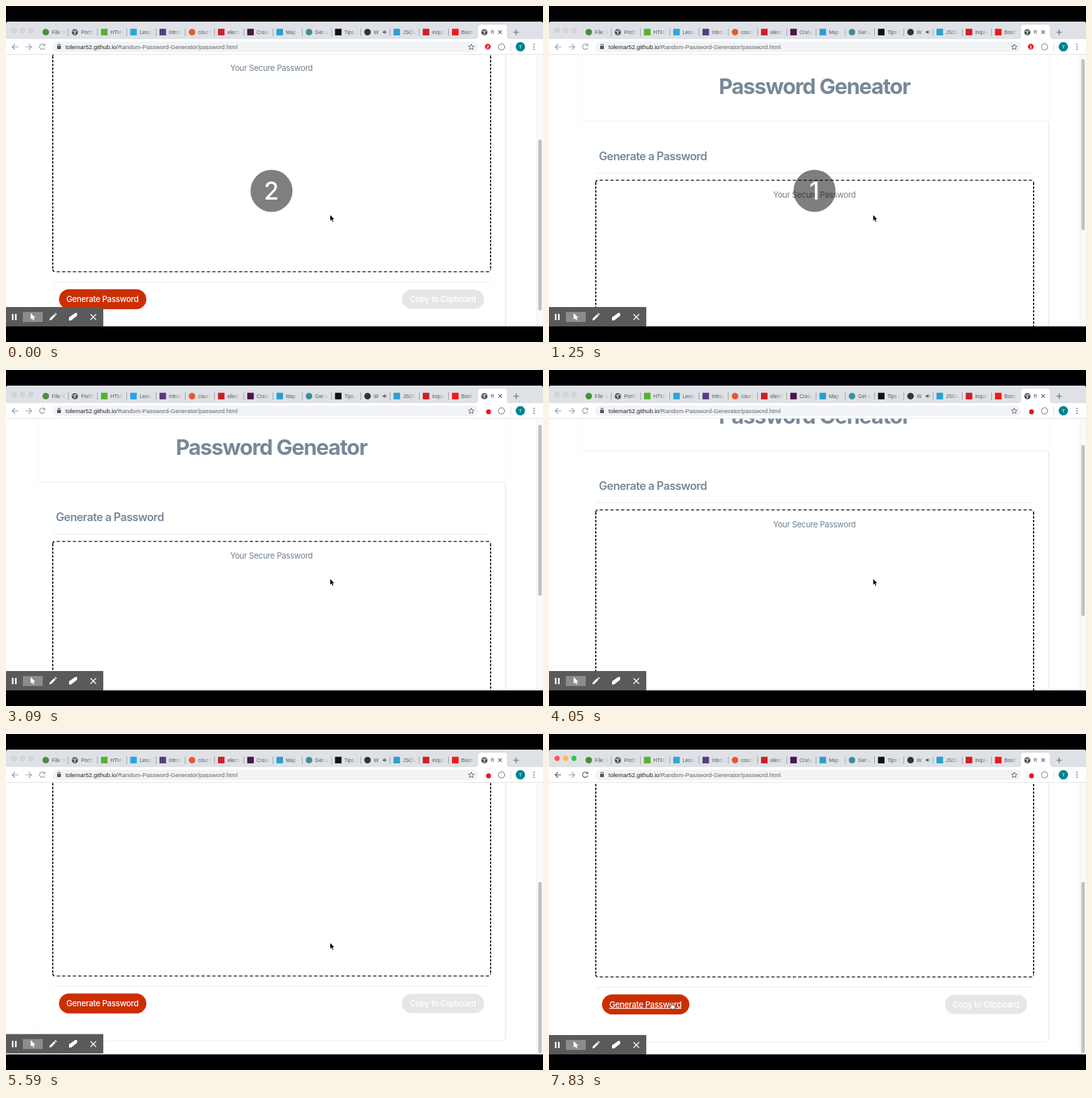
Animation, 861 px wide and 538 px high, one loop 8 s. Source, as an HTML page:

```html
<!DOCTYPE html>
<html lang="en">
<head>
<meta charset="utf-8">
<title>Password generator demo</title>
<style>
html, body { margin: 0; width: 100%; height: 100%; overflow: hidden; background: #000; }
svg { display: block; }
.ui { font-family: "Liberation Sans", Arial, sans-serif; }
.page { font-family: Inter, Roboto, sans-serif; font-size: 13px; letter-spacing: -.026em; fill: #708090; text-anchor: middle; }
.title { font-size: 34.5px; font-weight: 700; letter-spacing: -.04em; fill: #778899; }
.sub { font-size: 18px; font-weight: 600; letter-spacing: -.034em; fill: #778899; text-anchor: start; }
.btn { font-weight: 500; fill: #fff; }
.line { fill: none; stroke: #5f6368; stroke-width: 1.2; }
#card { filter: drop-shadow(1px 0 1.5px rgba(0, 0, 0, .13)); }
#lights circle { fill: #d3d5d9; stroke: #c6c8cc; stroke-width: .6; }
.active #lights circle { fill: var(--c); stroke: none; }
#back, #reload { stroke: #92969b; }
.active #back, .active #reload { stroke: #505458; }
.active #generate { text-decoration: underline; }
#hand, .active #arrow { display: none; }
.active #hand { display: inline; }
</style>
</head>
<body>
<svg id="stage" width="861" height="538" viewBox="0 0 861 538">
  <defs>
    <linearGradient id="fade"><stop stop-color="#dee1e6" stop-opacity="0"/><stop offset="1" stop-color="#dee1e6"/></linearGradient>
    <clipPath id="view"><path d="M0 78H861V513H0Z"/></clipPath>
    <path id="pointer" d="M0 0V10.6L2.4 8.4 4 12.1 5.9 11.3 4.3 7.7H7.6Z"/>
  </defs>
  <rect width="861" height="538"/>
  <path d="M0 513V29Q0 25 4 25H857Q861 25 861 29V513Z" fill="#fff"/>

  <g clip-path="url(#view)">
    <g id="page" class="page">
      <path d="M51.5 70V184M803 70V184" stroke="#f6f6f6"/>
      <rect id="card" x="52" y="185" width="748" height="546" rx="3" fill="#fff"/>
      <text class="title" x="425.5" y="140.5">Password Geneator</text>
      <text class="sub" x="80" y="246.5">Generate a Password</text>
      <path d="M75 267.5H777M75 644.5H777" stroke="#ebebeb"/>
      <g fill="none" stroke="#222" stroke-width="1.7">
        <path d="M75 283Q75 279 79 279H773Q777 279 777 283M75 624Q75 628 79 628H773Q777 628 777 624" stroke-dasharray="5.2 3.4"/>
        <path d="M75 283V624M777 283V624" stroke-dasharray="3.8 2.2" stroke-width="2"/>
      </g>
      <text x="425.5" y="306.5">Your Secure Password</text>
      <rect x="85" y="656" width="140" height="32" rx="16" fill="#cc2e00"/>
      <text id="generate" class="btn" x="154.5" y="676.7">Generate Password</text>
      <rect x="635" y="656.5" width="131.5" height="31" rx="15.5" fill="#e6e6e6"/>
      <text class="btn" x="700.5" y="676.7">Copy to Clipboard</text>
    </g>
    <path d="M851 78H861V513H851Z" fill="#fafafa"/>
    <path d="M851.5 78V513" stroke="#ececec"/>
    <rect id="thumb" x="853.5" width="5.5" height="274" rx="2.75" fill="#c1c1c1"/>
    <g id="tools">
      <path d="M0 482H156V513H0Z" fill="#5a5a5a"/>
      <path d="M27 490H59V506H27Z" fill="#8c8c8c"/>
      <path d="M9.5 493H12V503H9.5ZM14.5 493H17V503H14.5Z" fill="#fff"/>
      <use href="#pointer" x="39.5" y="491.5" fill="#fff"/>
      <path d="M69.5 503.5L70.3 500.3 77.2 493.4 79.6 495.8 72.7 502.7ZM78 492.6L79.2 491.4 81.6 493.8 80.4 495Z" fill="#fff"/>
      <path d="M101 498.5L111 491.5H114V496L104.500 503.500H101Z" fill="#fff"/>
      <path d="M135.500 493.500L144.500 502.500M144.500 493.500L135.500 502.500" stroke="#fff" stroke-width="1.5"/>
    </g>
  </g>

  <g class="ui">
    <path d="M0 53V29Q0 25 4 25H857Q861 25 861 29V53Z" fill="#dee1e6"/>
    <g id="lights">
      <circle cx="13" cy="39" r="4.200" style="--c:#fc5753"/>
      <circle cx="26.500" cy="39" r="4.200" style="--c:#fdbc40"/>
      <circle cx="40" cy="39" r="4.200" style="--c:#33c748"/>
    </g>
    <path d="M752 53Q757 53 757 48V35Q757 30 762 30H798Q803 30 803 35V48Q803 53 808 53Z" fill="#fff"/>
    <g id="tabs" font-size="8.300" fill="#55595e"></g>
    <path d="M604 40.500H606L608.500 38.500V45L606 43H604ZM610 39.500Q611.500 41.700 610 44" fill="#5f6368"/>
    <path class="line" d="M789.500 39L795 44.500M795 39L789.500 44.500M813.500 42H822.500M818 37.500V46.500"/>
    <path d="M0 53H861V77H0Z" fill="#fff"/>
    <path d="M0 77.500H861" stroke="#e2e3e5"/>
    <rect x="74" y="57" width="683" height="17" rx="8.500" fill="#f1f3f4"/>
    <path id="back" class="line" d="M19.500 65.500H10.500M14.500 61L10 65.500 14.500 70"/>
    <path class="line" style="stroke:#9a9ea3" d="M31.500 65.500H40.500M36.500 61L41 65.500 36.500 70"/>
    <path id="reload" class="line" d="M61.500 62.500A4.300 4.300 0 1 0 62.200 66.500M62.300 60.500V63.500H59"/>
    <path d="M82 64H88V69H82Z" fill="#505458"/>
    <path class="line" d="M83.300 64.500V62.800A1.700 1.700 0 0 1 86.700 62.800V64.500"/>
    <text x="95.500" y="68.700" font-size="9.570" fill="#222">tolemar52.github.io<tspan fill="#5f6368">/Random-Password-Generator/password.html</tspan></text>
    <path class="line" stroke-linejoin="round" style="stroke-width:1" d="M746 61L747.300 64 750.500 64.300 748.100 66.400 748.800 69.600 746 67.900 743.200 69.600 743.900 66.400 741.500 64.300 744.700 64Z"/>
    <circle id="badge" fill="#e21b22"/>
    <text id="badgeText" x="772.500" y="68" font-size="8" font-weight="700" fill="#fff" text-anchor="middle"></text>
    <circle class="line" cx="794.500" cy="65.500" r="5" style="stroke-width:1"/>
    <path d="M809.500 59V72" stroke="#dadce0"/>
    <circle cx="824.700" cy="65.300" r="7.500" fill="#00838f"/>
    <text x="824.700" y="68" font-size="7.500" fill="#fff" text-anchor="middle">T</text>
    <path d="M846.500 61.500V70" stroke="#55595e" stroke-width="2" stroke-linecap="round" stroke-dasharray="0 3.900"/>
  </g>

  <g id="count">
    <circle cx="425.700" cy="296" r="33.700" fill="#000" fill-opacity=".5"/>
    <text id="digit" x="425.500" y="309.700" font-family="Inter, Roboto, sans-serif" font-size="39" font-weight="500" fill="#fff" text-anchor="middle"></text>
  </g>
  <g id="cursor" stroke="#fff" stroke-width=".8">
    <use id="arrow" href="#pointer"/>
    <path id="hand" fill="#fff" stroke="#222" d="M2.500 7V1.200Q3.400 0 4.300 1.200V4.300Q5.200 3.700 6 4.500 7 4 7.700 4.900 9 4.700 9 6V8.500L8 11H3.500L.5 7.300Q.6 5.900 2.500 7Z"/>
  </g>
</svg>
<script>
const $ = id => document.getElementById(id);
const move = (id, x, y) => $(id).setAttribute('transform', `translate(${x} ${y})`);
const setAll = (el, attrs) => { for (const k in attrs) el.setAttribute(k, attrs[k]); };

// Tabs: title and icon colour; "globe" is the browser's default page icon
const globe = 'globe';
const tabs = [
  ['File Sys', '#4a8f3c'], ['Portfolio', globe], ['HTML Fo', '#55b030'], ['Lessons', '#2ba6dc'],
  ['Introduc', '#563d7c'], ['course', '#e8592b'], ['electron', '#cb2027'], ['Crates', '#4a154b'],
  ['Map · A', '#2a9fd0'], ['Get a lo', '#3d8f9a'], ['Tips to', '#111'], ['W', '#333'],
  ['JSON V', '#2a9fd0'], ['inquirer', '#cb2027'], ['Bootstr', '#f01818'], ['R', globe]
];
const round = [0, 5, 9, 11];
$('tabs').innerHTML = tabs.map(([title, color], i) => {
  const x = 63.5 + i * 46.9;
  const icon = color === globe
    ? `<circle cx="${x}" cy="42" r="5" fill="#4d5156"/><path d="M${x - 3.5} 40.500l3 .5 1 2 -1.500 2.500M${x} 38.500l1 1.500 2.500 0" fill="none" stroke="#fff" stroke-width="1.200"/>`
    : `<rect x="${x - 5}" y="36.500" width="10.500" height="10.500" rx="${round.includes(i) ? 5.25 : 0.5}" fill="${color}"/>`;
  const width = i === 15 ? 7 : 20;
  const shade = i === 15 ? '' : `<rect x="10" width="10" height="14" fill="url(#fade)"/>`;
  const edge = i < 14 ? `<path d="M${x + 36.3} 36V48" stroke="#9a9da2"/>` : '';
  return `${icon}<svg x="${x + 10}" y="35" width="${width}" height="14"><text y="9.800">${title}</text>${shade}</svg>${edge}`;
}).join('');

// Bursts of evenly spaced picture updates: start, end, count
const bursts = [[100, 1120, 8], [1250, 1620, 3], [1950, 1950, 1], [3090, 3590, 4], [4050, 4950, 7],
  [5270, 5590, 3], [5760, 6260, 4], [6430, 7060, 5], [7370, 7830, 4]];
const ticks = [0];
for (const [from, to, n] of bursts)
  for (let i = 0; i < n; i++) ticks.push(n > 1 ? from + (to - from) * i / (n - 1) : from);

const scrollKeys = [[0, 202.5], [100, 190], [400, 120], [700, 45], [1120, 4], [1250, 0], [2900, 0],
  [3090, 4.5], [3590, 44], [4050, 55], [4500, 110], [4950, 169], [5270, 198], [5430, 232],
  [5590, 240.5], [5760, 239.7], [5930, 239]];
const xKeys = [[5760, 519.5], [6260, 446], [6590, 340], [6900, 195], [7060, 163], [7370, 170], [7830, 193]];
const yKeys = [[5760, 334], [6260, 359.5], [6590, 392], [6900, 420], [7060, 425], [7370, 427], [7830, 429.8]];
const maxScroll = 239;

function along(keys, t) {
  const i = keys.findIndex(k => k[0] > t);
  if (i === 0) return keys[0][1];
  if (i < 0) return keys[keys.length - 1][1];
  const [t0, a] = keys[i - 1], [t1, b] = keys[i];
  return a + (b - a) * (t - t0) / (t1 - t0);
}

function draw(time) {
  const t = ticks.findLast(k => k <= time % 8000);
  const scroll = along(scrollKeys, t);
  move('page', 0, -scroll);
  move('tools', 0, -Math.max(0, scroll - maxScroll));
  $('thumb').setAttribute('y', 85 + .636 * Math.min(scroll, maxScroll));

  const digit = t < 620 ? '2' : '1', counting = t < 1950;
  $('digit').textContent = digit;
  $('count').setAttribute('opacity', t < 1430 ? 1 : t < 1620 ? .5 : 0);
  $('badgeText').textContent = counting ? digit : '';
  setAll($('badge'), counting ? { cx: 772.5, cy: 65.2, r: 4.6 } : { cx: 773.7, cy: 67, r: 3.9 });

  move('cursor', along(xKeys, t), along(yKeys, t));
  $('stage').classList.toggle('active', t >= 7370);
}

const start = performance.now();
function frame() {
  draw(performance.now() - start);
  requestAnimationFrame(frame);
}
frame();
</script>
</body>
</html>
```
